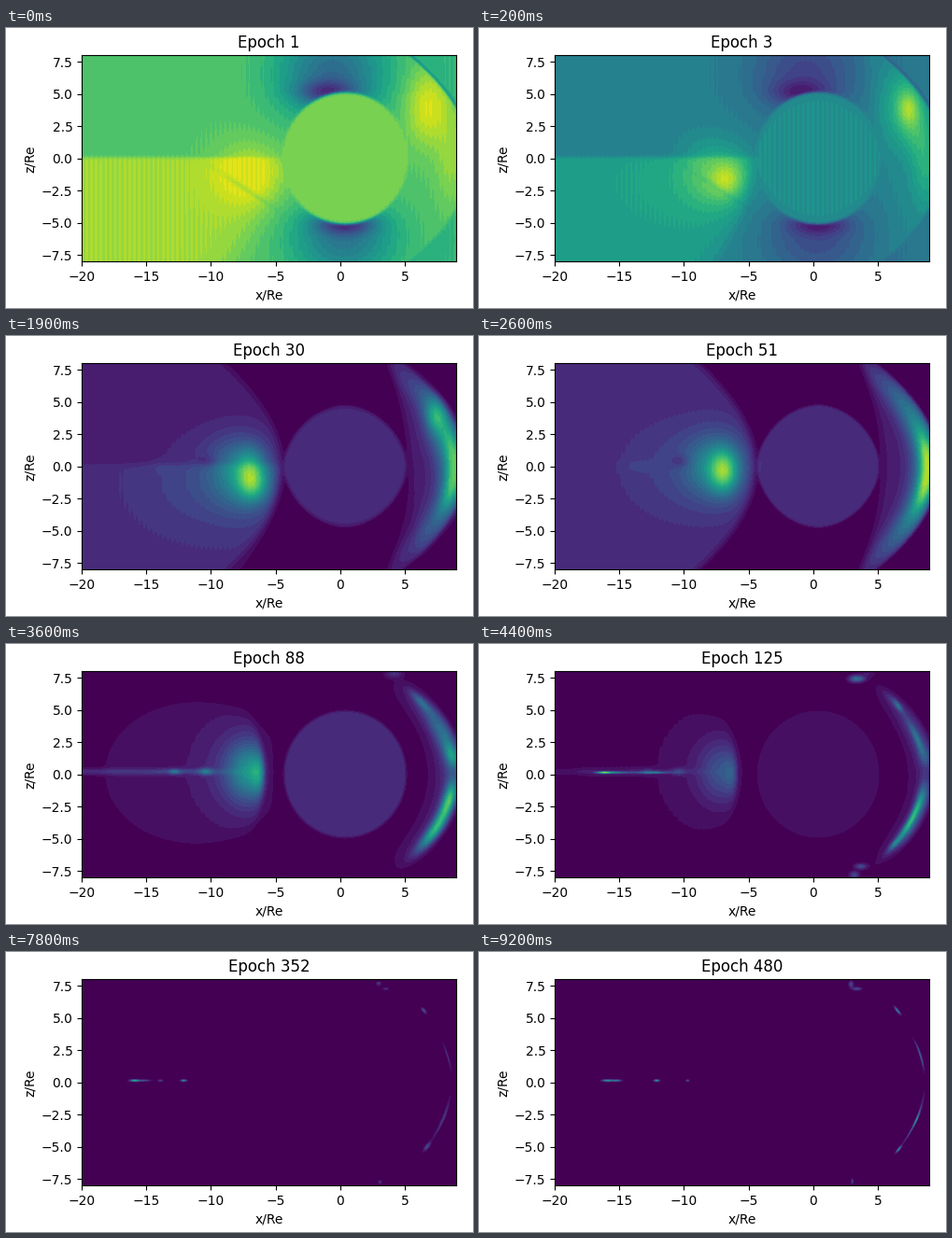
A matplotlib script that plays this animation: 500x300 px, repeating every 9.3 s.

```python
import numpy as np
import matplotlib.pyplot as plt
from matplotlib.animation import FuncAnimation

W, H = 500, 300
LEFT, RIGHT, TOP, BOTTOM = 81.2, 482.2, 29.3, 250.3
FRAMES = 93
LEVELS = 25

x, z = np.meshgrid(-20 + 29 * (np.arange(401) + 0.5) / 401,
                   8 - 16 * (np.arange(221) + 0.5) / 221)
# Signed distance in x from the curved front on the right
s = x - 8.75 + 0.075 * z ** 2


def step(t):
    return 1 / (1 + np.exp(-np.clip(t, -50, 50)))


def blob(a, x0, z0, sx, sz, tilt=0):
    c, n = np.cos(np.radians(tilt)), np.sin(np.radians(tilt))
    u, v = (x - x0) * c + (z - z0) * n, (z - z0) * c - (x - x0) * n
    return a * np.exp(-(u / sx) ** 2 - (v / sz) ** 2)


def arc(a, z0, dz, s0, w, p=2):
    return a * np.exp(-((s - s0) / w) ** 2 - np.abs((z - z0) / dz) ** p)


def streak(a, x0, sx):
    return blob(a, x0, 0.13, sx, 0.085)


def disc(a, rx, rz, p=2.0, soft=0.012):
    r = (np.abs((x - 0.4) / rx) ** p + np.abs(z / rz) ** p) ** (1 / p)
    return a * step((1 - r) / soft)


def start_field():
    low = step(-(z - 0.05) / 0.06)
    tail = step((-5.2 - 0.05 * z ** 2 - x) / 0.9)
    inside = step((1.4 - s) / 0.08)
    v = 0.75 + 0.13 * low * tail + blob(0.17, -7, -1.2, 2.6, 2.4)
    v = np.minimum(v, 0.965)
    v -= blob(0.07, -7.3, -2.4, 2.5, 0.2, -33.6)
    v -= blob(0.38, -0.6, 6.6, 4.2, 3.6) + blob(0.3, -1, 5.1, 2.2, 0.9)
    v -= blob(0.33, 0.3, -6.3, 4, 3) + blob(0.35, 0.4, -5.1, 2.2, 0.8)
    v += inside * (blob(0.22, 6.8, 4, 1.8, 3) + blob(0.1, 8.6, -0.3, 1.2, 3.5))
    v -= 0.07 * (1 - inside)
    v -= 0.14 * np.exp(-((s - 1.5) / 0.16) ** 2) * (z > 2)
    ball = disc(1, 4.87, 5.12)
    return np.clip(v * (1 - ball) + 0.815 * ball, 0, 0.97)


def lopsided_field():
    low = step(-(z - 0.15) / 0.12)
    tail = step((-4.7 - 0.045 * z ** 2 - x) / 0.22)
    v = tail * (0.13 * low + low * blob(0.1, -9.5, -2, 5, 3)
                + blob(0.28, -7.4, -1.3, 2.3, 2.4)
                + blob(0.42, -6.7, -1.6, 1.1, 1.2)
                + blob(0.07, -9, 1, 2, 1.6))
    inner = 5.5 - 0.13 * z - 0.008 * z ** 2
    right = step((1.4 - s) / 0.08) * step((x - inner) / 0.2)
    v += right * (0.08 + blob(0.42, 7.7, 3, 1.2, 2.8, 12)
                  + blob(0.38, 7.4, 3.9, 0.75, 1.2)
                  + blob(0.22, 8.8, -1.2, 1.1, 2.8))
    return v + disc(0.065, 4.85, 4.57, 1.85)


def symmetric_field():
    tail = step((-4.5 - 0.068 * z ** 2 - x) / 0.22)
    v = tail * (0.13 + blob(0.1, -9.5, -0.3, 5, 3.8)
                + blob(0.3, -7.5, 0, 2.2, 2.4)
                + blob(0.4, -6.9, -0.4, 1.05, 1.6)
                - blob(0.1, -10.3, 0.4, 0.7, 0.5)
                + blob(0.04, -13.7, 0, 1, 0.5))
    right = step((1 - s) / 0.1) * step((x - 5.3 + 0.025 * z ** 2) / 0.22)
    v += right * (0.09 + arc(0.38, 0, 6.8, 0.1, 1.3, 4)
                  + arc(0.36, 0.9, 1.8, 0.1, 0.6)
                  + arc(0.36, -1.6, 1.8, 0.1, 0.6))
    return v + disc(0.14, 4.7, 4.75, 1.85)


def split_field():
    halo = np.hypot((x + 11.3) / 6.8, (z - 0.1) / 5.4)
    core = step((-5.85 - 0.05 * z ** 2 - x) / 0.12)
    v = 0.02 + 0.045 * step((1 - halo) / 0.04) * step((-5.2 - x) / 0.1)
    v += core * (blob(0.1, -8, 0.3, 2.8, 3.2) + blob(0.38, -7, 0.2, 1.7, 2.3)
                 + blob(0.18, -6.3, 0, 0.6, 1.4))
    v += blob(0.12, -19, 0.2, 8, 0.25) + blob(0.1, -12, 0.2, 3, 0.22)
    v += blob(0.2, -12.8, 0.2, 0.4, 0.2) + blob(0.22, -10.4, 0.2, 0.5, 0.28)
    right = step((0.9 - s) / 0.12)
    v += right * (arc(0.12, 0, 6.5, -0.2, 1.3, 8)
                  + arc(0.2, 5.6, 0.8, -0.1, 0.4)
                  + arc(0.26, 3, 2.4, 0, 0.8)
                  + arc(0.3, 1.4, 0.9, 0.1, 0.5)
                  + arc(0.58, -2, 1.5, 0, 0.5)
                  + arc(0.5, -4.4, 1.5, 0, 0.55))
    return v + blob(0.14, 4.2, 7.8, 0.6, 0.3) + disc(0.125, 4.72, 4.9)


def sparse_field():
    v = streak(0.65, -16.2, 0.5) + streak(0.45, -15.5, 1) + streak(0.3, -12.6, 1.5)
    v += streak(0.15, -12.1, 0.4)
    v += blob(0.4, 3.3, 7.4, 0.5, 0.28) + blob(0.15, 3.8, 7.4, 0.4, 0.2)
    v += blob(0.24, 6.6, 5.3, 0.5, 0.18, -55) + arc(0.24, 2.8, 1.2, -0.12, 0.25)
    v += arc(0.45, -3.4, 1.8, -0.2, 0.25)
    v += blob(0.22, 6.3, -5.4, 0.6, 0.2, 48)
    return v + blob(0.28, 3.7, -7.15, 0.45, 0.22) + blob(0.28, 3.2, -7.8, 0.35, 0.25)


def faint_field():
    v = streak(0.6, -15.9, 0.35) + streak(0.25, -15.2, 0.5)
    v += streak(0.22, -13.9, 0.2) + streak(0.48, -12.1, 0.22)
    v += blob(0.17, 3, 7.65, 0.2, 0.17) + blob(0.14, 3.55, 7.25, 0.25, 0.12)
    v += blob(0.25, 6.5, 5.55, 0.28, 0.12, -50) + arc(0.15, 2, 1, -0.1, 0.08)
    v += arc(0.18, -2.9, 1.5, -0.15, 0.12)
    return v + blob(0.22, 6.75, -5, 0.4, 0.16, 52) + blob(0.16, 3.1, -7.75, 0.13, 0.16)


def final_field():
    v = streak(0.55, -15.9, 0.4) + streak(0.4, -15.2, 0.35)
    v += streak(0.55, -12.1, 0.2) + streak(0.28, -9.7, 0.13)
    v += blob(0.24, 2.95, 7.6, 0.18, 0.25) + blob(0.25, 3.4, 7.25, 0.35, 0.13)
    v += blob(0.45, 6.55, 5.55, 0.35, 0.09, -52) + arc(0.32, 2.1, 1, -0.1, 0.08)
    v += arc(0.3, -3, 1.7, -0.1, 0.08) + arc(0.25, -2.9, 0.5, -0.1, 0.08)
    return v + blob(0.42, 6.65, -5.2, 0.3, 0.09, 50) + blob(0.22, 3.05, -7.7, 0.1, 0.2)


KEYS = [0, 9, 26, 36, 57, 78, 92]
EASE = [2, 1, 1, 2, 1, 1]
FIELDS = [make() for make in (start_field, lopsided_field, symmetric_field,
                              split_field, sparse_field, faint_field, final_field)]
GRAIN = 1 + 0.01 * np.cos(2 * np.pi * x / 0.37)


def field_at(n):
    i = min(int(np.searchsorted(KEYS, n, side="right")) - 1, len(EASE) - 1)
    u = (n - KEYS[i]) / (KEYS[i + 1] - KEYS[i])
    w = 1 - (1 - u) ** EASE[i]
    a, b = FIELDS[i], FIELDS[i + 1]
    v = a * (1 - w) + b * w
    # Every step is scaled to its own peak
    v = v * (a.max() * (1 - w) + b.max() * w) / v.max()
    return np.floor(np.clip(v * GRAIN, 0, 1) * LEVELS) / LEVELS


def epoch(n):
    decade, k = divmod(n, 10)
    return 5 * decade * (decade + 1) + (decade + 1) * (k + 1)


plt.rcParams["font.family"] = "DejaVu Sans"
fig = plt.figure(figsize=(W / 100, H / 100), dpi=100, facecolor="white")
ax = fig.add_axes([LEFT / W, 1 - BOTTOM / H, (RIGHT - LEFT) / W, (BOTTOM - TOP) / H])
image = ax.imshow(field_at(0), extent=(-20, 9, -8, 8), cmap="viridis",
                  vmin=0, vmax=1, interpolation="nearest", aspect="auto")
ax.set_xticks(range(-20, 6, 5))
ax.set_yticks(np.arange(-7.5, 8, 2.5))
ax.set_xlabel("x/Re")
ax.set_ylabel("z/Re")
title = ax.set_title("Epoch 1")


def draw(n):
    image.set_data(field_at(n))
    title.set_text(f"Epoch {epoch(n)}")
    return image, title


anim = FuncAnimation(fig, draw, frames=FRAMES, interval=100, repeat=True,
                     repeat_delay=0, blit=False)
plt.show()
```
